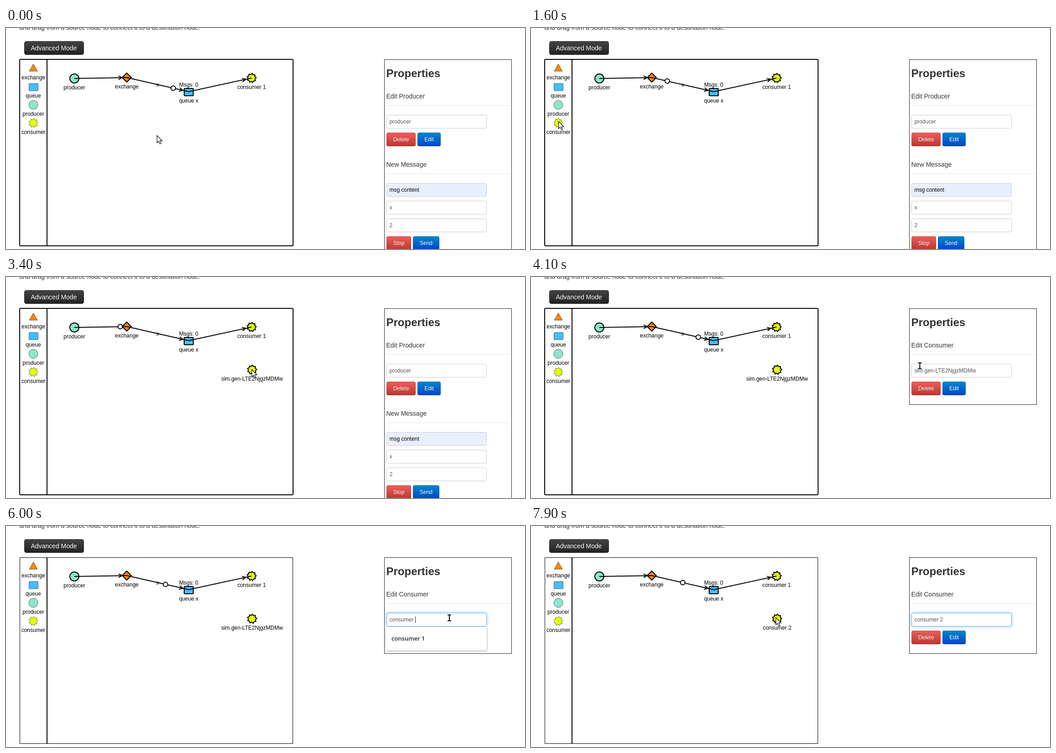
Animation, 1139 px wide and 486 px high, one loop 8000 ms. Source, as an HTML page:

```html
<!DOCTYPE html>
<html lang="en">
<head>
<meta charset="utf-8">
<title>Message flow</title>
<style>
html, body { margin: 0; width: 100%; height: 100%; overflow: hidden; background: #fff; }
svg { display: block; width: 100%; height: 100%; }
text { font: 12px "Liberation Sans", Arial, sans-serif; white-space: pre; }
.mid { text-anchor: middle; }
.head { font-size: 14px; fill: #333; }
.title { font-size: 24px; font-weight: bold; fill: #333; }
.field { fill: #555; }
.btn { fill: #fff; text-anchor: middle; text-shadow: 0 -1px 0 rgba(0, 0, 0, .25); }
.item { font: 600 13px "Open Sans", "Noto Sans", sans-serif; fill: #222; }
.wire { fill: none; stroke: #000; stroke-width: 2; }
</style>
</head>
<body>
<svg id="stage" viewBox="0 0 1139 486" preserveAspectRatio="none">
  <defs>
    <linearGradient id="dark" x2="0" y2="1"><stop stop-color="#444"/><stop offset="1" stop-color="#222"/></linearGradient>
    <linearGradient id="red" x2="0" y2="1"><stop stop-color="#ee5f5b"/><stop offset="1" stop-color="#bd362f"/></linearGradient>
    <linearGradient id="blue" x2="0" y2="1"><stop stop-color="#08c"/><stop offset="1" stop-color="#04c"/></linearGradient>
    <filter id="blur" x="-10%" y="-60%" width="120%" height="220%"><feGaussianBlur stdDeviation="3.5"/></filter>
    <filter id="soft" x="-10%" y="-20%" width="120%" height="150%"><feGaussianBlur stdDeviation="1.5"/></filter>
  </defs>
</svg>
<script>
const LOOP = 8000, STEP = 100, HOP = 800;
const GEN = "sim.gen-LTE2NjgzMDMw", NEW = "consumer 2";
const TEAL = "#8ee5ce", ORANGE = "#ff8408", SKY = "#42bfff", LIME = "#e1ff0a";
const stage = document.getElementById("stage");

function add(tag, attrs, parent = stage, body = "") {
  const el = document.createElementNS("http://www.w3.org/2000/svg", tag);
  for (const k in attrs) el.setAttribute(k, attrs[k]);
  el.textContent = body;
  parent.appendChild(el);
  return el;
}
const group = (parent = stage) => add("g", {}, parent);
const text = (x, y, body, cls = "mid", parent = stage) => add("text", { x, y, class: cls }, parent, body);
const show = (el, on) => el.setAttribute("visibility", on ? "inherit" : "hidden");
const move = (el, [x, y]) => el.setAttribute("transform", `translate(${x} ${y})`);

// Node shapes
const ink = thin => thin
  ? { stroke: "#000", "stroke-opacity": .55, "stroke-width": 1 }
  : { stroke: "#000", "stroke-width": 2, "stroke-linejoin": "round" };

function disc(x, y, thin, parent) {
  return add("circle", { cx: x, cy: y, r: 10, fill: TEAL, ...ink(thin) }, parent);
}
function box(x, y, thin, parent) {
  return add("rect", { x: x - 10, y: y - 8, width: 20, height: 16, rx: 1, fill: SKY, ...ink(thin) }, parent);
}
function gear(x, y, thin, parent) {
  const pts = Array.from({ length: 18 }, (_, i) => {
    const a = (i * 20 - 84) * Math.PI / 180, r = i % 2 ? 7.7 : 10.3;
    return (x + r * Math.cos(a)).toFixed(2) + "," + (y + r * Math.sin(a)).toFixed(2);
  });
  return add("polygon", { points: pts.join(" "), fill: LIME, ...ink(thin) }, parent);
}

// Page heading and toolbar
text(29.5, 4, "and drag from a source node to connect it to a destination node.", "head");
add("rect", { x: 40.5, y: 29.5, width: 130, height: 29, rx: 4, fill: "url(#dark)", stroke: "#222" });
text(105, 49, "Advanced Mode", "btn").style.fontSize = "14px";

const thick = add("rect", { x: 30, y: 69, width: 600, height: 410, rx: 2, class: "wire" });
const slim = add("rect", { x: 30.5, y: 69.5, width: 599, height: 409, fill: "none", stroke: "#000" });
add("path", { d: "M90 70V478", class: "wire" });

add("path", { d: "M60 79L69 95H51Z", fill: ORANGE, ...ink(true) });
box(60.5, 130, true);
disc(60, 169, true);
gear(60, 209, true);
["exchange", "queue", "producer", "consumer"].forEach((s, i) => text(60, 113 + 40 * i, s));

// Graph
const route = [[150, 111], [265, 109], [401, 140], [539, 110]];
disc(150, 111);
add("path", { d: "M265 99L275 109L265 119L255 109Z", fill: ORANGE, ...ink() });
box(401, 141);
gear(539, 110);

function wire([x1, y1], [x2, y2], gap) {
  const a = Math.atan2(y2 - y1, x2 - x1);
  const at = (back, side) => [
    x2 - back * Math.cos(a) - side * Math.sin(a),
    y2 - back * Math.sin(a) + side * Math.cos(a)
  ].map(v => v.toFixed(1)).join(" ");
  add("path", {
    d: `M${x1} ${y1}L${x2} ${y2}M${at(gap + 8, -4)}L${at(gap, 0)}L${at(gap + 8, 4)}`, class: "wire"
  });
}
[10, 13, 13].forEach((gap, i) => wire(route[i], route[i + 1], gap));

text(150, 135, "producer");
text(265, 133, "exchange");
text(333, 129, "x");
text(401, 164, "queue x");
text(539, 134, "consumer 1");
const count = text(401, 129, "");

const fresh = group();
gear(0, 0, false, fresh);
const freshName = text(0, 24, "", "mid", fresh);

const dots = [0, 1].map(() => add("circle", { r: 5, fill: "#fff", stroke: "#000", "stroke-width": 2 }));

// Properties panel
const panel = add("rect", { x: 830.5, y: 69.5, width: 279, fill: "#fff", stroke: "#222" });

function rule(y, parent) {
  add("path", { d: `M835 ${y}H1106`, stroke: "#e5e5e5" }, parent);
}
function input(y, body, parent, fill = "#fff") {
  const frame = add("rect", { x: 835.5, y: y + .5, width: 219, height: 29, rx: 3, fill, stroke: "#ccc" }, parent);
  return { frame, label: text(841.5, y + 19, body, "field", parent) };
}
function button(x, y, w, body, hue, parent) {
  add("rect", { x, y, width: w, height: 30, rx: 4, fill: `url(#${hue})` }, parent);
  add("rect", {
    x: x + .5, y: y + .5, width: w - 1, height: 29, rx: 3.5, fill: "none", stroke: "#000", "stroke-opacity": .15
  }, parent);
  text(x + w / 2, y + 19, body, "btn", parent);
}

text(834.5, 108, "Properties", "title");
const subtitle = text(834.5, 155, "", "head");
rule(170.5);
const glow = add("rect", { x: 835, y: 191, width: 220, height: 30, rx: 4, fill: "#52a8ec", filter: "url(#blur)" });
const name = input(191, "");
const ring = add("rect", { x: 835.5, y: 191.5, width: 219, height: 29, rx: 3, fill: "none", stroke: "#52a8ec" });
let wave = "M888 212";
for (let x = 890; x < 978; x += 2) wave += `L${x} ${x % 4 ? 210.5 : 212.5}`;
const squiggle = add("path", { d: wave, fill: "none", stroke: "#e33", "stroke-width": .9 });
const caret = add("path", { stroke: "#222" });
button(835, 230, 64, "Delete", "red");
button(903, 230, 51, "Edit", "blue");

const compose = group();
text(834.5, 305, "New Message", "head", compose);
rule(320.5, compose);
input(341, "msg content", compose, "#e8f0fe").label.style.fill = "#000";
input(380, "x", compose);
input(419, "2", compose);
button(835, 458, 54, "Stop", "red", compose);
button(893, 458, 58, "Send", "blue", compose);

const menu = group();
const menuShade = add("rect", { x: 834, y: 223, width: 221.5, rx: 3, fill: "#000", opacity: .4, filter: "url(#soft)" }, menu);
const menuBox = add("rect", { x: 834, y: 222, width: 221, rx: 2, fill: "#fff" }, menu);
text(846, 252, "consumer 1", "item", menu);
const second = text(846, 290, "consumer", "item", menu);

// Pointers
const arrow = add("path", {
  d: "M.5 .5V16.3L4 13.1L6.6 19L9.3 17.8L6.8 12.2H11.8Z", fill: "#fff", stroke: "#111", "stroke-width": 1.2
});
const beam = group();
const beamPath = "M-4 -6.5H-1L0 -5.5L1 -6.5H4M0 -6V6M-4 6.5H-1L0 5.5L1 6.5H4";
add("path", { d: beamPath, fill: "none", stroke: "#fff", "stroke-width": 4 }, beam);
add("path", { d: beamPath, fill: "none", stroke: "#000", "stroke-width": 2 }, beam);

// Pointer track: time, x, y
const track = [
  [0, 331, 236], [300, 331, 236], [900, 225, 232], [1200, 100, 215], [1400, 60, 205], [1600, 60, 205],
  [1700, 145, 206], [1800, 255, 207], [2000, 420, 207], [2200, 510, 205], [2400, 539, 203], [3600, 539, 203],
  [3900, 720, 190], [4200, 920, 198], [4400, 973, 202], [6300, 973, 202], [6500, 895, 275], [6700, 690, 329],
  [6900, 490, 256], [7000, 429, 227], [7300, 470, 215], [7600, 530, 203], [7700, 537, 201], [LOOP, 537, 201]
];
function pointer(t) {
  const i = track.findIndex(p => p[0] > t), a = track[i - 1], b = track[i];
  const k = (t - a[0]) / (b[0] - a[0]);
  return [a[1] + (b[1] - a[1]) * k, a[2] + (b[2] - a[2]) * k];
}

function typed(t) {
  if (t < 3600) return "producer";
  if (t < 4800) return GEN;
  if (t < 5300) return GEN.slice(0, Math.max(0, 20 - (t - 4700) / 25));
  if (t < 6200) return NEW.slice(0, Math.min(9, Math.ceil((t - 5200) / 800 * 9)));
  return NEW;
}

function drawFlow(t) {
  // The recorded flow stalls for one step at 2500
  const now = t >= 2500 ? t - STEP : t;
  const age = (now + 1400) % 2000;
  [age, age + 2000].forEach((a, i) => {
    const hops = a / HOP, leg = Math.min(2, Math.floor(hops)), k = hops - leg;
    show(dots[i], hops <= 3);
    const [p, q] = [route[leg], route[leg + 1]];
    move(dots[i], [p[0] + (q[0] - p[0]) * k, p[1] + (q[1] - p[1]) * k]);
  });
  count.textContent = "Msgs: " + (age === 2 * HOP ? 1 : 0);
}

function drawPanel(t) {
  const edit = t >= 3600, focus = Math.max(0, Math.min(1, (t - 4600) / 200)), focused = focus > 0;
  show(thick, t < 4600);
  show(slim, t >= 4600);
  show(compose, !edit);
  panel.setAttribute("height", edit ? 211 : 440);
  subtitle.textContent = edit ? "Edit Consumer" : "Edit Producer";

  const value = typed(t);
  name.label.textContent = value;
  glow.setAttribute("opacity", .6 * focus);
  ring.setAttribute("opacity", .8 * focus);
  show(squiggle, focused && value === GEN);
  const x = Math.round(841.5 + (value ? name.label.getComputedTextLength() : 0)) + .5;
  caret.setAttribute("d", `M${x} 199V213`);
  show(caret, focused && (t < 6100 || Math.floor((t - 6100) / 500) % 2 === 0));

  const two = value.length < 9, h = two ? 90 : 52;
  show(menu, t >= 5300 && t < 6200);
  show(second, two);
  menuBox.setAttribute("height", h);
  menuShade.setAttribute("height", h);
}

function drawPointer(t) {
  const at = pointer(t), [x, y] = at;
  const inField = x > 835 && x < 1055 && y > 191 && y < 221;
  show(arrow, !inField);
  show(beam, inField);
  move(arrow, at);
  move(beam, at);
  show(fresh, t >= 1700);
  move(fresh, t < 2600 ? [x + 1, y + 1] : [540, 204]);
  freshName.textContent = t < 2600 ? "consumer" : t < 6400 ? GEN : NEW;
}

function draw(ms) {
  const t = Math.floor(ms % LOOP / STEP) * STEP;
  drawFlow(t);
  drawPanel(t);
  drawPointer(t);
}

const start = performance.now();
function tick() {
  draw(performance.now() - start);
  requestAnimationFrame(tick);
}
tick();
</script>
</body>
</html>
```
